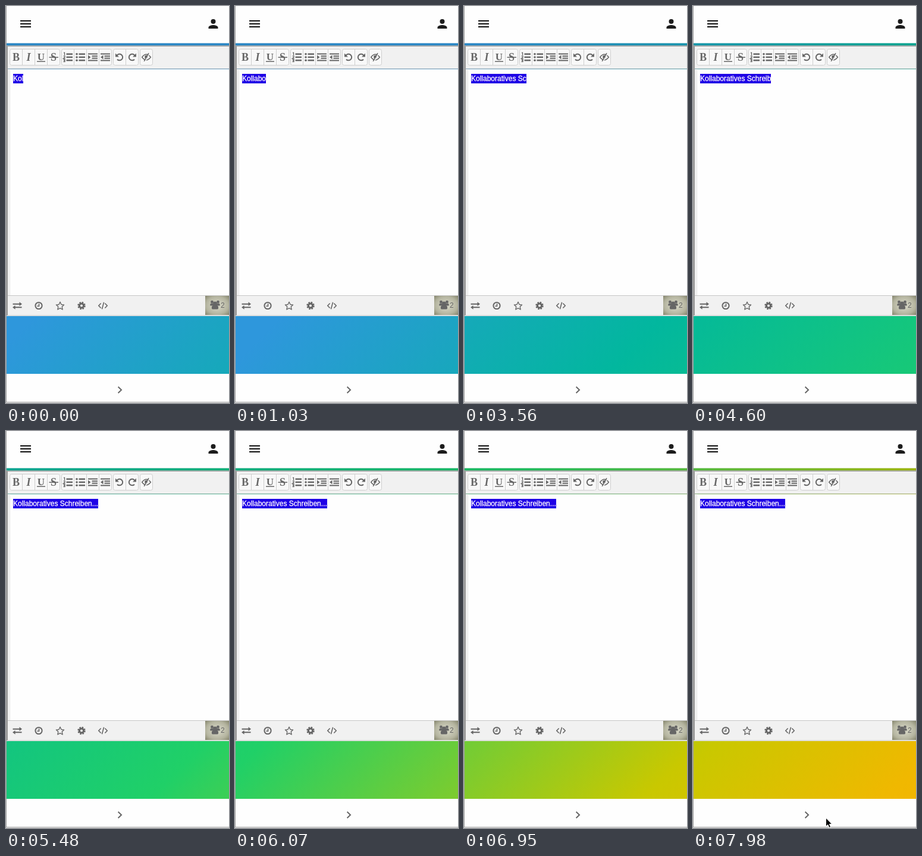
These frames come from a looping animation (375x667 px, 8000 ms). An HTML page:

```html
<!DOCTYPE html>
<html lang="de">
<head>
<meta charset="utf-8">
<title>Editor</title>
<style>
html, body { margin: 0; width: 100%; height: 100%; overflow: hidden; background: #fefefe; }
#stage { position: relative; width: 375px; height: 667px; overflow: hidden; }
#sweep {
  position: absolute; left: -100px; top: 0; width: 3200px; height: 667px;
  background: linear-gradient(135deg, #2e97dc 474px, #02b79e 1011px, #20d067 1549px,
    #c9c800 2086px, #f0b800 2355px, #fdae00 2623px);
}
svg { position: absolute; left: 0; top: 0; }
#typed {
  position: absolute; left: 12px; top: 114px; height: 16px; white-space: pre;
  font: 12px/16px "Liberation Sans", Arial, sans-serif;
  color: #fff; background: #1f00e6; -webkit-text-stroke: .3px #fff;
}
.serif { font: bold 18px "Liberation Serif", "Noto Serif", serif; text-anchor: middle; }
.line { fill: none; stroke: #666; stroke-width: 2; }
</style>
</head>
<body>
<div id="stage">
  <div id="sweep"></div>
  <svg width="375" height="667" viewBox="0 0 375 667">
    <defs>
      <radialGradient id="badge" cx=".5" cy=".5" r=".72">
        <stop offset=".2" stop-color="#d0d0bf"/>
        <stop offset=".65" stop-color="#b4b49f"/>
        <stop offset="1" stop-color="#828269"/>
      </radialGradient>
      <g id="bars">
        <path d="M-2.5-5.2H8M-2.5 0H8M-2.5 5.2H8" stroke="#666" stroke-width="2.6"/>
      </g>
      <g id="indentBars">
        <path d="M-8-5.4H8M-1.5-1.8H8M-1.5 1.8H8M-8 5.4H8" stroke="#666" stroke-width="2"/>
      </g>
      <g id="turn">
        <path class="line" stroke-width="2.2" d="M-4.6-2.8A5.3 5.3 0 1 1-4 3.7"/>
        <path d="M-7-6.6V-.6H-1z"/>
      </g>
    </defs>

    <!-- header -->
    <path fill="#fefefe" d="M0 0H375V62.5H0z"/>
    <path fill="#000" opacity=".11" d="M0 62.5H375V66.5H0z"/>
    <path stroke="#111" stroke-width="2" d="M24 25H42M24 30H42M24 35H42"/>
    <g fill="#1c1c1c">
      <circle cx="348.5" cy="26" r="4"/>
      <path d="M340.5 38V36C340.5 33.3 345.8 32 348.5 32S356.5 33.3 356.5 36V38z"/>
    </g>

    <!-- editor frame -->
    <path fill="#f1f1f1" d="M1 66.5H375V105H1z"/>
    <path fill="#aaa" opacity=".72" d="M1 105H375V106.2H1z"/>
    <path fill="#fefefe" d="M1 106.2H375V487H1z"/>
    <path fill="#f1f1f1" d="M3 106.2H7.5V487H3zM1 487H375V521H1z"/>
    <path fill="#c6c6c6" d="M3 486H375V487H3z"/>
    <path fill="#999" d="M1 66.5H375V68H3V520H1z"/>
    <path fill="#dedede" d="M3 519H375V521H1z"/>

    <g fill="#f8f8f8" stroke="#cfcfcf">
      <rect x="6.5" y="72.5" width="84" height="27" rx="3"/>
      <rect x="93.5" y="72.5" width="84" height="27" rx="3"/>
      <rect x="180.5" y="72.5" width="42" height="27" rx="3"/>
      <rect x="225.5" y="72.5" width="21" height="27" rx="3"/>
      <path d="M27.5 73V99M48.5 73V99M69.5 73V99M114.5 73V99M135.5 73V99M156.5 73V99M201.5 73V99"/>
    </g>

    <g fill="#666">
      <g class="serif">
        <text x="17" y="92">B</text>
        <text x="38" y="92" font-style="italic">I</text>
        <text x="59" y="91" font-size="17">U</text>
        <text x="80" y="92">S</text>
      </g>
      <path d="M52 92.5H66V94H52zM72.5 85.5H88V87H72.5z"/>

      <g transform="translate(104 86)">
        <use href="#bars"/>
        <path class="line" style="stroke-width:1.3" d="M-7-7.5H-5.5V-3M-7.5-1.8H-5V0L-7.5 2H-4.5M-7.5 4H-5L-6 5.5H-5V7.5H-7.5"/>
      </g>
      <g transform="translate(125 86)">
        <use href="#bars"/>
        <circle cx="-6" cy="-5.2" r="1.8"/><circle cx="-6" r="1.8"/><circle cx="-6" cy="5.2" r="1.8"/>
      </g>
      <g transform="translate(146 86)"><use href="#indentBars"/><path d="M-8-3.6L-3.5 0L-8 3.6z"/></g>
      <g transform="translate(167 86)"><use href="#indentBars"/><path d="M-3.5-3.6L-8 0L-3.5 3.6z"/></g>
      <use href="#turn" x="191" y="86"/>
      <use href="#turn" transform="translate(212 86) scale(-1 1)"/>
      <g transform="translate(236 86)">
        <path class="line" style="stroke-width:1.5" d="M-7.3 0Q0-9.5 7.3 0Q0 9.5-7.3 0z"/>
        <circle cy="-.5" r="2.8"/>
        <path stroke="#f8f8f8" stroke-width="1.4" d="M5.4-6L-2 7"/>
        <path stroke="#666" stroke-width="1.5" d="M4-6.8L-3.8 6.8"/>
      </g>

      <!-- lower toolbar -->
      <g transform="translate(19 503.5)">
        <path class="line" d="M-7.5-2.8H4M-4 2.8H7.5"/>
        <path d="M3.5-6.2L8-2.8L3.5.6zM-3.5-.6L-8 2.8L-3.5 6.2z"/>
      </g>
      <g transform="translate(55 503.5)">
        <circle class="line" r="5.6"/>
        <path class="line" style="stroke-width:1.5" d="M.5-3.5V.7H-2.8"/>
      </g>
      <path class="line" style="stroke-width:1.4" stroke-linejoin="round" transform="translate(91 503.8)"
        d="M0-6.6L2-2.3L6.6-1.7L3.2 1.5L4.1 6.2L0 3.9L-4.1 6.2L-3.2 1.5L-6.6-1.7L-2-2.3z"/>
      <g transform="translate(127 503.5)">
        <circle class="line" style="stroke-width:3" r="3.6"/>
        <circle class="line" style="stroke-width:2.4" r="5.5" stroke-dasharray="2.5 1.82"/>
      </g>
      <path class="line" style="stroke-width:1.6" transform="translate(163 503.5)"
        d="M-3.4-4L-7.2 0L-3.4 4M3.4-4L7.2 0L3.4 4M1.6-5.8L-1.6 5.8"/>

      <path fill="url(#badge)" d="M335 487H375V519H335z"/>
      <g transform="translate(351.5 502)">
        <circle cx="-5" cy="-4.8" r="2.4"/><circle cx="5" cy="-4.8" r="2.4"/>
        <path d="M-8.2 1.5V-.5Q-8-2.5-6-2.5H6Q8-2.5 8.2-.5V1.5z"/>
        <circle cy="-2.2" r="3.4"/>
        <path d="M-5.6 5.5Q-5.6 1-3 1H3Q5.6 1 5.6 5.5Q5.6 7.5 3.6 7.5H-3.6Q-5.6 7.5-5.6 5.5z"/>
      </g>
      <text x="361" y="506.5" font-family="Liberation Sans, Arial, sans-serif" font-size="12">2</text>
    </g>

    <!-- footer -->
    <path fill="#fefefe" d="M0 618H375V667H0z"/>
    <path class="line" d="M188.6 639.8L194 645L188.6 650.2"/>
    <path fill="#a2a2a2" d="M0 0H1V665H375V666.2H0z"/>
    <path id="pointer" fill="#000" stroke="#fff" d="M223.5 650V664.5L226.8 661.4L229.1 666.5L231.6 665.4L229.4 660.5H233.8z"/>
  </svg>
  <span id="typed"></span>
</div>
<script>
const LOOP = 8000, TICK = 147.78, LAST_TICK = 54;
const TEXT = "Kollaboratives Schreiben...";
// [tick, value] pairs
const SHIFT = [[0, 0], [6, -40], [13, 40], [18, 200], [24, 470], [37, 1230], [41, 1520], [47, 1930], [54, 2290]];
const LETTERS = [[0, 3], [13, 11], [24, 17], [36, 27], [54, 27]];

const [sweep, typed, pointer] = ["sweep", "typed", "pointer"].map(id => document.getElementById(id));

function valueAt(track, tick) {
  const next = Math.max(1, track.findIndex(([at]) => at >= tick));
  const [t0, v0] = track[next - 1], [t1, v1] = track[next];
  return v0 + (v1 - v0) * (tick - t0) / (t1 - t0);
}

function draw(time) {
  const tick = Math.min(LAST_TICK, Math.floor(time % LOOP / TICK + 0.05));
  sweep.style.transform = `translateX(${-valueAt(SHIFT, tick)}px)`;
  typed.textContent = TEXT.slice(0, Math.floor(valueAt(LETTERS, tick) + 0.001));
  pointer.style.visibility = tick === LAST_TICK ? "visible" : "hidden";
}

const start = performance.now();
function loop() {
  draw(performance.now() - start);
  requestAnimationFrame(loop);
}
loop();
</script>
</body>
</html>
```
